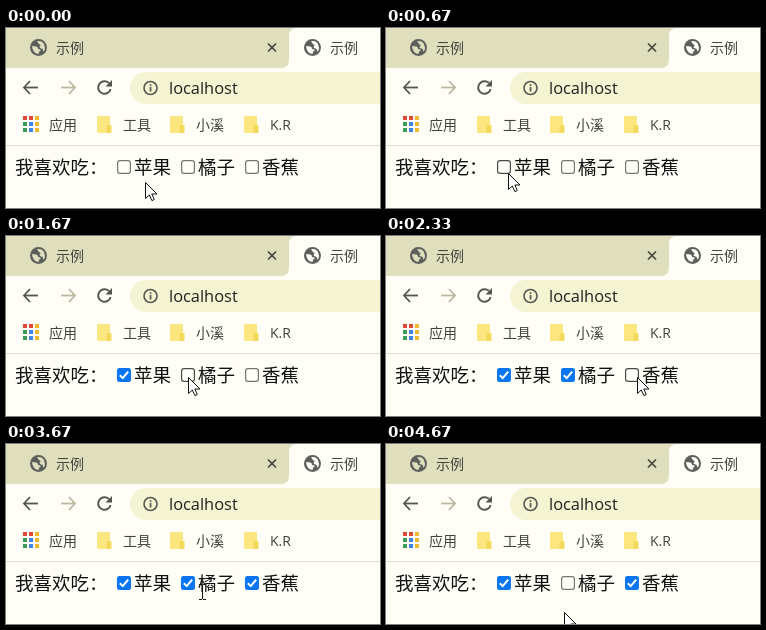
These frames come from a looping animation (374 px wide and 180 px high, 5330 ms). An HTML page with a canvas:

```html
<!DOCTYPE html>
<html lang="zh-CN">
<head>
<meta charset="utf-8">
<title>示例</title>
<style>
html, body { margin: 0; width: 100%; height: 100%; overflow: hidden; background: #fefef7; }
canvas { display: block; }
</style>
</head>
<body>
<canvas id="stage" width="374" height="180"></canvas>
<script>
const ctx = document.getElementById('stage').getContext('2d');
const LOOP = 5330;
const CJK = '"Noto Sans CJK SC", "Noto Sans CJK", sans-serif';
const LATIN = '"Open Sans", "Noto Sans", sans-serif';
const PAPER = '#fefef7', STRIP = '#dfdfbe', PILL = '#f4f4d2', INK = '#55564e';
const BOX = { y: 132, size: 14 };

// start time, pointer x, pointer y, shape
const pointer = [
  [0, 139, 154, 'arrow'],
  [330, 132, 146, 'arrow'],
  [670, 122, 145, 'arrow'],
  [1000, 119, 143, 'arrow'],
  [1670, 182, 141, 'arrow'],
  [2330, 251, 141, 'arrow'],
  [3330, 233, 148, 'beam'],
  [3670, 196, 148, 'beam'],
  [4000, 184, 137, 'arrow'],
  [4330, 183, 140, 'arrow'],
  [4670, 178, 168, 'arrow']
];

const fruits = [
  { x: 111, name: '苹果', on: 1330, off: LOOP },
  { x: 175, name: '橘子', on: 2000, off: 4330 },
  { x: 239, name: '香蕉', on: 2670, off: LOOP }
];

function text(s, x, y, size, color, family = CJK) {
  ctx.font = `${size}px ${family}`;
  ctx.fillStyle = color;
  ctx.fillText(s, x, y);
}

function line(points, color, width) {
  ctx.beginPath();
  points.forEach(([x, y], i) => i ? ctx.lineTo(x, y) : ctx.moveTo(x, y));
  ctx.strokeStyle = color;
  ctx.lineWidth = width;
  ctx.stroke();
}

function rounded(x, y, w, h, r, color) {
  ctx.beginPath();
  ctx.roundRect(x, y, w, h, r);
  ctx.fillStyle = color;
  ctx.fill();
}

function disc(x, y, r, color) {
  ctx.beginPath();
  ctx.arc(x, y, r, 0, Math.PI * 2);
  ctx.fillStyle = color;
  ctx.fill();
}

function globe(x, y, land) {
  ctx.save();
  ctx.translate(x, y);
  disc(0, 0, 8.5, '#5c5f5b');
  ctx.fillStyle = land;
  ctx.fill(new Path2D('M-6.5-1.5L-2-1Q0 0-.5 1.5L2 2Q2.5 4 .5 4.2L0 6.5Q-6 5.5-6.5-1.5Z'));
  ctx.fill(new Path2D('M-1.5-6.3Q3-7 5.2-4L6.5 0Q6.7 2.5 5 4.2L4.2 1.5 1.5.5Q.5-1.5 2.5-2L.5-3.5Z'));
  ctx.restore();
}

function tabs() {
  ctx.fillStyle = STRIP;
  ctx.fillRect(0, 0, 374, 40);
  ctx.fillStyle = PAPER;
  ctx.fill(new Path2D('M275 40Q283 40 283 32V8Q283 0 291 0H374V40Z'));
  globe(32.5, 19.5, STRIP);
  globe(306.5, 19.5, PAPER);
  text('示例', 50, 25, 14, '#45463e');
  text('示例', 324, 25, 14, '#45463e');
  line([[262, 15.5], [270, 23.5]], '#45463e', 1.7);
  line([[270, 15.5], [262, 23.5]], '#45463e', 1.7);
}

function navArrow(x, dir, color) {
  const y = 59.5;
  line([[x - 7 * dir, y], [x + 7 * dir, y]], color, 1.8);
  line([[x + dir, y - 6.5], [x + 7 * dir, y], [x + dir, y + 6.5]], color, 1.8);
}

function toolbar() {
  navArrow(25, -1, INK);
  navArrow(62, 1, '#b9b8a0');

  ctx.beginPath();
  ctx.arc(98.5, 59.5, 6.3, 0.25, Math.PI * 1.75);
  ctx.strokeStyle = INK;
  ctx.lineWidth = 1.9;
  ctx.stroke();
  ctx.fillStyle = INK;
  ctx.fill(new Path2D('M106 52V58.5H99.5Z'));

  rounded(124, 44, 280, 32, 16, PILL);
  ctx.beginPath();
  ctx.arc(144.5, 60, 6.5, 0, Math.PI * 2);
  ctx.lineWidth = 1.6;
  ctx.stroke();
  ctx.fillStyle = INK;
  ctx.fillRect(143.7, 59, 1.7, 4.5);
  ctx.fillRect(143.7, 56.3, 1.7, 1.7);
  text('localhost', 163, 66, 16.4, '#20211e', LATIN);
}

function folder(x) {
  rounded(x, 88, 13, 17, 1, '#fbe680');
  rounded(x + 9.5, 97, 5, 8, 1, '#f5d95c');
}

function bookmarks() {
  const dots = ['#e0483a', '#e0483a', '#f0b92f', '#3d9b58', '#4285e8', '#f0b92f', '#3d9b58', '#4285e8', '#f0b92f'];
  dots.forEach((color, i) => {
    ctx.fillStyle = color;
    ctx.fillRect(17 + i % 3 * 6, 88 + Math.floor(i / 3) * 6, 4, 4);
  });
  text('应用', 43, 102, 14, '#41423c');
  [91, 164, 238].forEach(folder);
  text('工具', 117, 102, 14, '#41423c');
  text('小溪', 190, 102, 14, '#41423c');
  text('K.R', 264, 102, 14, '#41423c', LATIN);
  ctx.fillStyle = '#deded2';
  ctx.fillRect(0, 117, 374, 1);
}

function checkbox(x, checked, hover) {
  const { y, size } = BOX;
  if (checked) {
    rounded(x, y, size, size, 2.5, hover ? '#0860c8' : '#0875f2');
    line([[x + 2.8, y + 7.2], [x + 5.7, y + 10.1], [x + 11.2, y + 3.7]], '#fff', 2);
  } else {
    rounded(x, y, size, size, 3, hover ? '#4b4b48' : '#767670');
    rounded(x + 1.2, y + 1.2, size - 2.4, size - 2.4, 1.8, '#fffffa');
  }
}

function drawPointer(x, y, shape) {
  ctx.save();
  ctx.translate(x, y);
  if (shape === 'arrow') {
    const p = new Path2D('M.5.5V16.5L4.3 13 6.9 18.6 9.3 17.5 6.8 12H12Z');
    ctx.fillStyle = '#fff';
    ctx.fill(p);
    ctx.strokeStyle = '#111';
    ctx.lineWidth = 1;
    ctx.stroke(p);
  } else {
    ctx.fillStyle = '#111';
    ctx.fillRect(0, -7, 1, 14);
    [-8, 7].forEach(v => {
      ctx.fillRect(-3, v, 3, 1);
      ctx.fillRect(1, v, 3, 1);
    });
  }
  ctx.restore();
}

function draw(t) {
  ctx.fillStyle = PAPER;
  ctx.fillRect(0, 0, 374, 180);
  tabs();
  toolbar();
  bookmarks();

  const [, px, py, shape] = pointer.filter(p => p[0] <= t).pop();
  text('我喜欢吃：', 9, 146, 18.5, '#111');
  for (const f of fruits) {
    const hover = px >= f.x && px < f.x + BOX.size && py >= BOX.y && py < BOX.y + BOX.size;
    checkbox(f.x, t >= f.on && t < f.off, hover);
    text(f.name, f.x + 17, 146, 18.5, '#111');
  }
  drawPointer(px, py, shape);
}

const start = performance.now();
function tick() {
  draw((performance.now() - start) % LOOP);
  requestAnimationFrame(tick);
}
tick();
</script>
</body>
</html>
```
